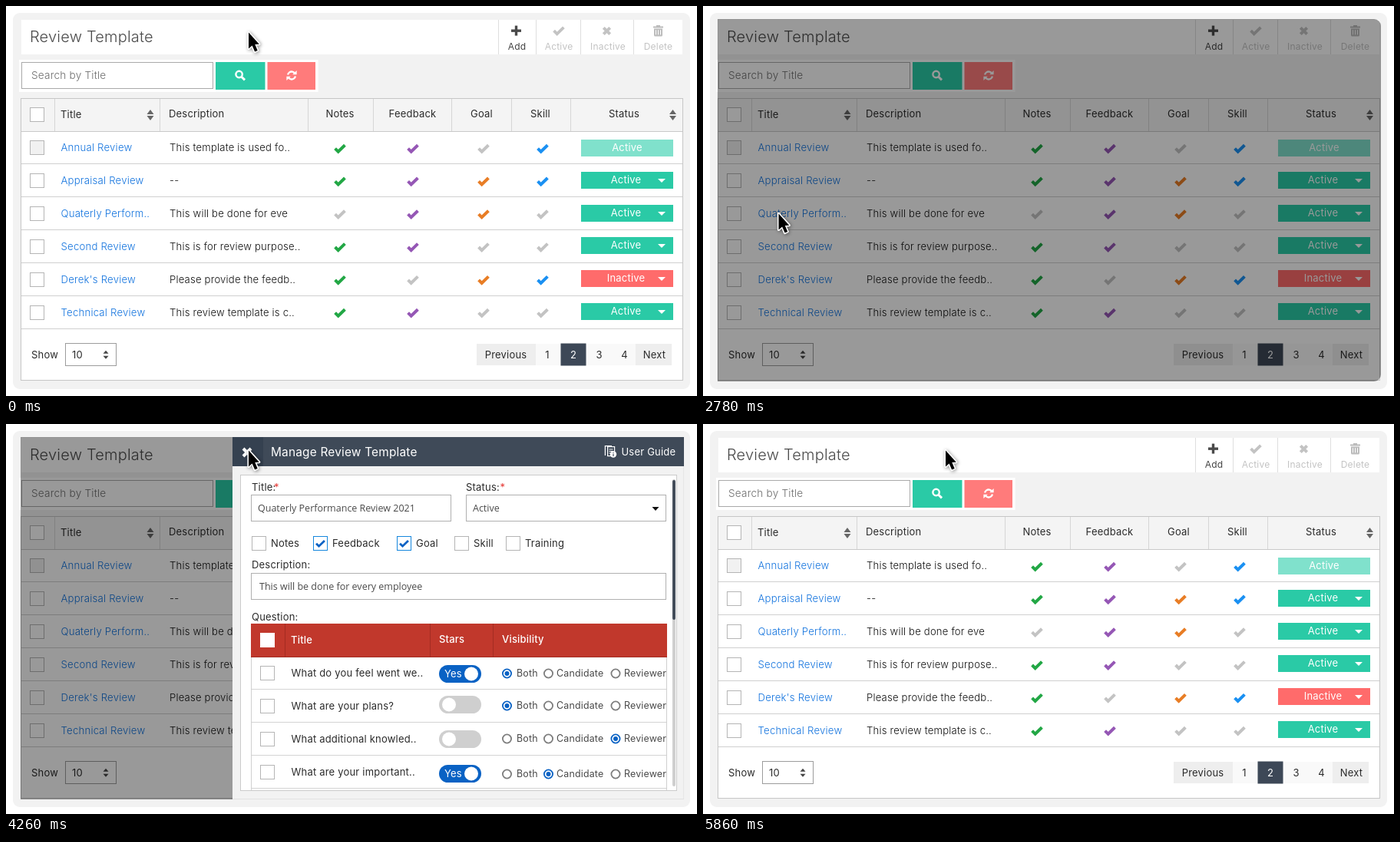
Recreate the animation shown at these times as an HTML page with a canvas. Size 900 by 508 pixels, loop 5960 ms.

```html
<!DOCTYPE html>
<html lang="en">
<head>
<meta charset="utf-8">
<title>Review Template</title>
<style>
html, body { margin: 0; width: 100%; height: 100%; overflow: hidden; background: #fff; }
canvas { display: block; width: 900px; height: 508px; }
</style>
</head>
<body>
<canvas id="stage"></canvas>
<script>
const LOOP = 5960;
const canvas = document.getElementById('stage');
const ratio = window.devicePixelRatio || 1;
canvas.width = 900 * ratio;
canvas.height = 508 * ratio;
const c = canvas.getContext('2d');
c.scale(ratio, ratio);

const UI = 'Inter, sans-serif';
const FIELD = '"Open Sans", sans-serif';
const LINK = '#1273de';
const LINK_ACTIVE = '#0a4a94';
const TEAL = '#2acaa6';
const GREY = '#c3c3c3';
const BLUE = '#0a62c4';

function box(x, y, w, h, fill, line) {
  if (fill) { c.fillStyle = fill; c.fillRect(x, y, w, h); }
  if (line) { c.strokeStyle = line; c.lineWidth = 1; c.strokeRect(x + .5, y + .5, w - 1, h - 1); }
}

function round(x, y, w, h, r, fill) {
  c.fillStyle = fill;
  c.beginPath();
  c.roundRect(x, y, w, h, r);
  c.fill();
}

function text(str, x, y, o = {}) {
  c.font = `${o.weight || 400} ${o.size || 13}px ${o.font || UI}`;
  c.letterSpacing = o.font ? '0px' : '0.2px';
  c.textAlign = o.align || 'left';
  c.fillStyle = o.color || '#2b2b2b';
  c.fillText(str, x, y);
}

function label(str, x, y, o) {
  text(str, x, y, { align: 'center', ...o });
}

function path(points, fill) {
  c.beginPath();
  points.forEach(([x, y]) => c.lineTo(x, y));
  c.closePath();
  if (fill) { c.fillStyle = fill; c.fill(); }
}

function stroke(points, color, width) {
  c.beginPath();
  points.forEach(([x, y]) => c.lineTo(x, y));
  c.strokeStyle = color;
  c.lineWidth = width;
  c.stroke();
}

function tick(x, y, color, k = 1, width = 4) {
  stroke([[x - 6.4 * k, y - .4 * k], [x - 2.3 * k, y + 3.7 * k], [x + 6.4 * k, y - 4.8 * k]], color, width);
}

function cross(x, y, r, color, width) {
  stroke([[x - r, y - r], [x + r, y + r]], color, width);
  stroke([[x + r, y - r], [x - r, y + r]], color, width);
}

function tri(x, y, w, h, color) {
  path([[x - w / 2, y], [x + w / 2, y], [x, y + h]], color);
}

function sorter(x, y, gap, w, h, color) {
  tri(x, y - gap, w, -h, color);
  tri(x, y + gap, w, h, color);
}

function disc(x, y, r, color) {
  c.fillStyle = color;
  c.beginPath();
  c.arc(x, y, r, 0, 7);
  c.fill();
}

function ring(x, y, r, color, width, from = 0, to = 7) {
  c.strokeStyle = color;
  c.lineWidth = width;
  c.beginPath();
  c.arc(x, y, r, from, to);
  c.stroke();
}

function trash(x, y, color) {
  box(x - 6.5, y - 5.5, 13, 2, color);
  box(x - 2.5, y - 7, 5, 2, color);
  round(x - 5.5, y - 2.5, 11, 10, [0, 0, 1.5, 1.5], color);
  for (const dx of [-3, 0, 3]) box(x + dx - .5, y - .8, 1, 6.2, '#fff');
}

function refresh(x, y) {
  for (const turn of [0, Math.PI]) {
    c.save();
    c.translate(x, y);
    c.rotate(turn);
    ring(0, 0, 5, '#fff', 2.3, Math.PI * 1.06, Math.PI * 1.8);
    path([[6.6, -6.6], [6.6, -1.2], [1.2, -1.2]], '#fff');
    c.restore();
  }
}

function toolbar() {
  box(20, 18, 861, 45, '#fff');
  text('Review Template', 31, 47, { size: 20, weight: 300, color: '#4a4a4a' });
  for (const x of [641, 690, 748, 817]) box(x, 18, 1, 45, '#dedede');
  box(658, 30.5, 13, 3.4, '#4a4a4a');
  box(662.8, 25.6, 3.4, 13, '#4a4a4a');
  tick(720, 32.6, GREY, 1, 3.8);
  cross(782.5, 32.5, 4.2, GREY, 4);
  trash(849.5, 32, '#bcbcbc');
  label('Add', 665.5, 57, { size: 12, color: '#444' });
  label('Active', 720, 57, { size: 12, color: GREY });
  label('Inactive', 784, 57, { size: 12, color: GREY });
  label('Delete', 849.5, 57, { size: 12, color: GREY });
}

function searchBar() {
  box(17, 70, 389.5, 42, '#fff');
  box(20, 73, 250, 35, '#fff', '#a9a9a9');
  text('Search by Title', 33, 95, { size: 13.6, weight: 300, color: '#6d6d6d' });
  box(273, 73, 64.5, 36, TEAL);
  ring(303.6, 89, 4.2, '#fff', 2.4);
  stroke([[306.5, 92], [311, 96.4]], '#fff', 3);
  box(340.5, 73, 62.5, 36, '#ff7b7b');
  refresh(372, 90.5);
}

const rows = [
  ['Annual Review', 'This template is used fo..', '1101'],
  ['Appraisal Review', '--', '1111'],
  ['Quaterly Perform..', 'This will be done for eve', '0110'],
  ['Second Review', 'This is for review purpose..', '1100'],
  ["Derek's Review", 'Please provide the feedb..', '1011'],
  ['Technical Review', 'This review template is c..', '1100']
];
const marks = [[435, '#22a745'], [530, '#9557b5'], [622, '#e87d25'], [699, '#1a90f2']];

function table(pressed) {
  box(19, 120, 863, 368, '#fff');
  box(19, 120, 863, 44, '#f4f4f4');
  box(19, 163, 863, 1, '#c9c9c9');
  for (const x of [63, 200, 393, 478, 580, 658, 735]) box(x, 121, 1, 42, '#d6d6d6');
  box(31, 132, 19, 19, '#fff', '#b5b5b5');
  text('Title', 71, 146);
  text('Description', 212, 145);
  label('Notes', 435, 145);
  label('Feedback', 529.5, 145);
  label('Goal', 619.5, 145);
  label('Skill', 696, 145);
  label('Status', 805, 145);
  sorter(188, 142, 1, 9, 6, '#666');
  sorter(868.5, 142, 1, 9, 6, '#666');

  rows.forEach(([name, about, flags], i) => {
    const y = 43 * i;
    box(31, 175 + y, 19, 19, i ? '#fff' : '#f1f1f1', '#b5b5b5');
    text(name, 71.5, 189 + y, { size: 13.2, weight: 300, color: pressed && i === 2 ? LINK_ACTIVE : LINK });
    text(about, 213, 189 + y, { size: 13.1, weight: 300, color: '#111' });
    marks.forEach(([x, color], k) => tick(x, 186 + 42.8 * i, flags[k] === '1' ? color : GREY));
    const top = Math.floor(174 + 42.6 * i);
    box(749, top, 120, 22, i === 0 ? '#80e1cc' : i === 4 ? '#ff6b6b' : TEAL);
    label(i === 4 ? 'Inactive' : 'Active', i ? 807.5 : 809, top + 15, { color: '#fff' });
    if (i) tri(854, top + 9, 10, 5, '#fff');
    box(20, 205 + y, 861, 1, '#d0d0d0');
  });
  box(19, 120, 863, 368, null, '#c6c6c6');
}

function footer() {
  text('Show', 33, 458.5);
  box(77, 439, 67, 30, '#fff', '#9c9c9c');
  text('10', 86, 458.5);
  sorter(130, 454.3, 1.5, 7, 4, '#444');
  box(613, 440, 77, 28, '#eee');
  box(690, 440, 130, 28, '#f9f9f9');
  box(820, 440, 47, 28, '#eee');
  box(722.5, 439.5, 33, 29, '#3d4857');
  label('Previous', 651, 458.5);
  ['1', '2', '3', '4'].forEach((n, i) =>
    label(n, [705, 739, 772.5, 805.5][i], 458.5, { color: i === 1 ? '#fff' : '#2b2b2b' }));
  label('Next', 844.5, 458.5);
}

function guideIcon() {
  const color = '#fff';
  c.strokeStyle = color;
  c.lineWidth = 1.2;
  c.strokeRect(783.6, 29.6, 9, 12);
  stroke([[780.4, 41], [780.4, 28.6], [789, 28.6]], color, 1.2);
  for (const y of [32.5, 35, 37.5]) box(785.5, y, 5, 1, color);
  disc(791, 39.5, 4.2, color);
  box(790.4, 37, 1.2, 1.2, '#3f4a58');
  box(790.4, 39, 1.2, 3, '#3f4a58');
}

function field(x, y, w, str, tx) {
  box(x, y, w, 35, '#fff', '#b0b0b0');
  text(str, tx, y + 21.5, { size: 12.5, font: FIELD, color: '#4a4a4a' });
}

function required(str, x, starX) {
  text(str, x, 87);
  text('*', starX, 87, { color: '#e53935' });
}

const options = [['Notes', 320, 0], ['Feedback', 400, 1], ['Goal', 509, 1], ['Skill', 584, 0], ['Training', 651, 0]];
const questions = [
  ['What do you feel went we..', 1, 0, 325],
  ['What are your plans?', 0, 0, 367],
  ['What additional knowled..', 0, 2, 410],
  ['What are your important..', 1, 1, 456]
];
const views = [['Both', 652.5, 665], ['Candidate', 706.5, 717], ['Reviewer', 794, 805]];

function toggle(y, on) {
  round(564, y - 11.5, 55, 23, 11.5, on ? BLUE : '#cfcfcf');
  disc(on ? 606 : 577, y, 9, '#fff');
  if (on) text('Yes', 571, y + 4.5, { color: '#fff' });
}

function panel(pressed) {
  box(295, 17, 588, 472, '#f2f2f2');
  box(882, 55, 1, 434, '#e6e6e6');
  box(295, 488, 588, 1, '#e2e2e2');
  box(295, 17, 588, 38, '#3f4a58');
  box(295, 17, 40, 38, '#354150');
  cross(314, 37, 5, pressed ? '#a9b0b8' : '#fff', 4);
  text('Manage Review Template', 345, 42, { size: 15.4, color: '#fff' });
  guideIcon();
  text('User Guide', 801.5, 41, { color: '#fff' });

  box(305, 66, 569, 412, '#fff', '#cbcbcb');
  round(868, 72, 4, 400, 2, '#cfcfcf');
  round(868, 73, 4, 182, 2, '#434d5a');

  required('Title:', 320, 349);
  required('Status:', 599, 643.5);
  field(319, 92, 261, 'Quaterly Performance Review 2021', 328);
  field(599, 92, 261, 'Active', 608);
  tri(846, 108, 9, 5, '#111');
  for (const [name, x, on] of options) {
    box(x, 146, 19, 19, '#fff', on ? '#1687dd' : '#b5b5b5');
    if (on) tick(x + 9.5, 156, BLUE, .85, 2.8);
    text(name, x + 25, 160);
  }
  text('Description:', 320, 188);
  field(319, 194, 541, 'This will be done for every employee', 330);
  text('Question:', 320, 256);

  box(319, 260, 542, 44, '#c1382c');
  for (const x of [363, 552, 634]) box(x, 260, 1, 44, '#a42c22');
  box(319, 303, 542, 1, '#a42c22');
  box(331, 272, 19, 19, '#fff');
  const head = { weight: 500, color: '#fff' };
  text('Title', 371, 286, head);
  text('Stars', 564, 285, head);
  text('Visibility', 646, 285, head);

  c.save();
  c.beginPath();
  c.rect(319, 304, 542, 173);
  c.clip();
  questions.forEach(([ask, on, pick, ry], i) => {
    const y = 43 * i;
    box(331, 315 + y, 19, 19, '#fff', '#b5b5b5');
    text(ask, 371.5, 329 + y);
    toggle([325.5, 365.5, 410.5, 455.5][i], on);
    views.forEach(([name, x, tx], k) => {
      const hit = k === pick;
      ring(x, ry, 5.6, hit ? BLUE : '#7d7d7d', 1.8);
      if (hit) disc(x, ry, 3, BLUE);
      text(name, tx, ry + 4.3, { size: 12.4, color: '#4a4a4a' });
    });
    box(319, 345 + y, 542, 1, '#d4d4d4');
  });
  box(319, 304, 1, 173, '#cfcfcf');
  box(860, 304, 1, 173, '#cfcfcf');
  c.restore();
}

function cursor(x, y) {
  c.save();
  c.translate(x, y);
  path([[0, 0], [0, 21], [4.6, 16.9], [8.1, 25], [11.7, 23.4], [8.3, 15.6], [13.8, 15.2]]);
  c.lineJoin = 'round';
  c.strokeStyle = '#fff';
  c.lineWidth = 3.2;
  c.shadowColor = 'rgba(0,0,0,.45)';
  c.shadowBlur = 4 * ratio;
  c.shadowOffsetX = ratio;
  c.shadowOffsetY = ratio;
  c.stroke();
  c.shadowColor = 'transparent';
  c.fillStyle = '#000';
  c.fill();
  c.restore();
}

// Pointer travels in seven equal 40 ms steps.
function steps(t, start) {
  return Math.max(0, Math.min(7, Math.floor((t - start) / 40) + 1)) / 7;
}

const within = (t, a, b) => t >= a && t < b;

function draw(t) {
  box(0, 0, 900, 508, '#fff');
  round(9, 9, 882, 490, 9, '#f2f2f2');
  toolbar();
  searchBar();
  table(within(t, 1780, 2280));
  footer();
  if (within(t, 2780, 5860)) round(19, 17, 864, 472, [0, 9, 9, 0], 'rgba(0,0,0,.4)');
  if (within(t, 2880, 5760)) panel(within(t, 4760, 5260));
  const k = steps(t, 1040) - steps(t, 4020);
  cursor(316 - 217.5 * k, 34.5 + 236 * k);
}

const begin = performance.now();
function frame() {
  draw((performance.now() - begin) % LOOP);
  requestAnimationFrame(frame);
}
frame();
</script>
</body>
</html>
```
